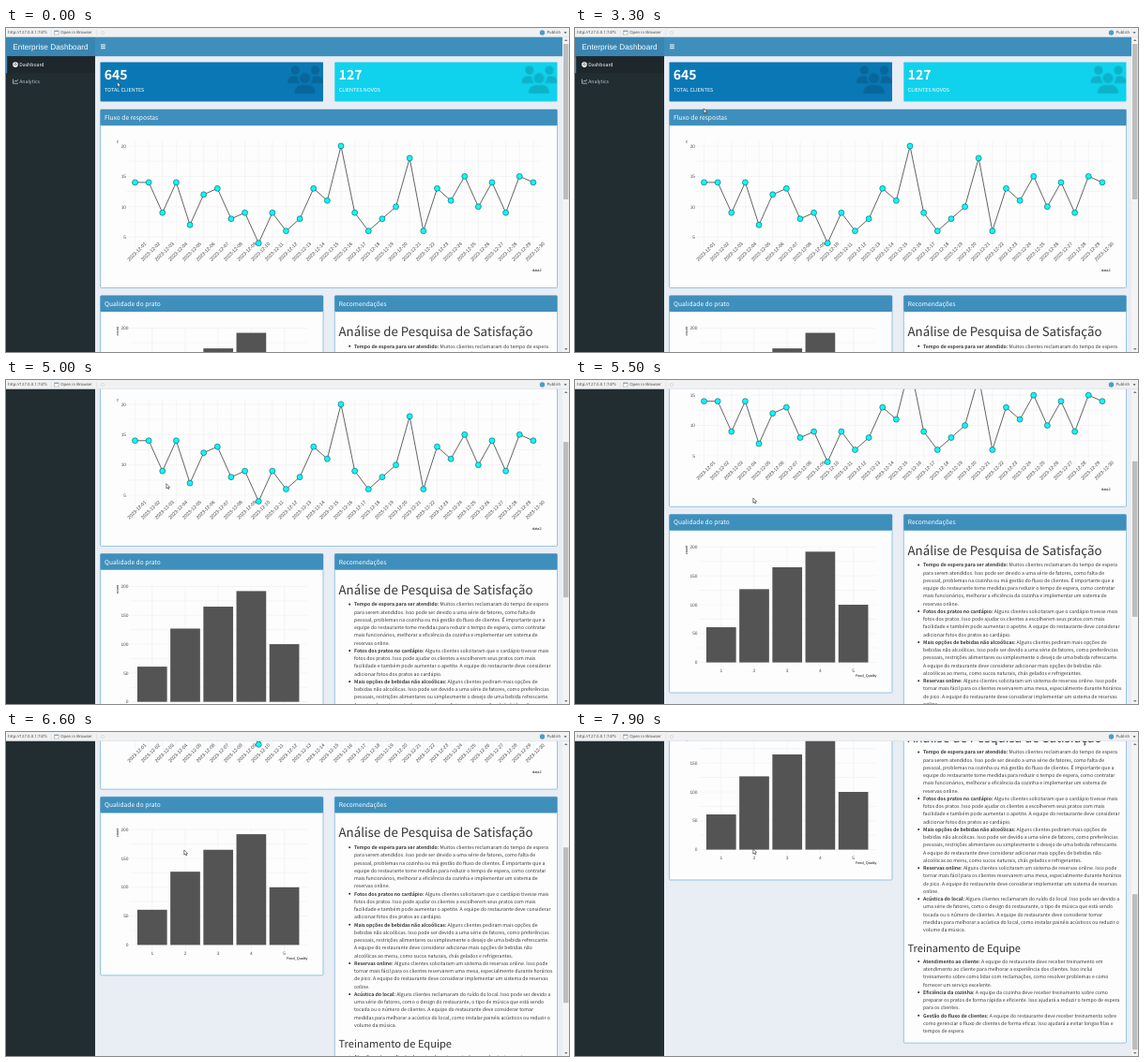
An HTML page that plays this animation: 600 px wide and 346 px high, repeating every 8 s.

```html
<!DOCTYPE html>
<html lang="pt">
<head>
<meta charset="utf-8">
<title>Enterprise Dashboard</title>
<style>
html, body { margin: 0; width: 100%; height: 100%; overflow: hidden; background: #e9edf4; }
svg { display: block; width: 600px; height: 346px; }
text { font-family: "Noto Sans CJK JP", "Noto Sans CJK SC", "Noto Sans CJK", sans-serif; text-rendering: geometricPrecision; white-space: pre; }
.plot text, .brand { font-family: "Liberation Sans", Arial, sans-serif; }
.tool text { font: 4.3px "Open Sans", sans-serif; fill: #3c3c3c; }
.body { font-size: 5.18px; fill: #383838; }
.grid { stroke: #ececee; stroke-width: .5; fill: none; }
.tick { font-size: 4.83px; fill: #4d4d4d; }
.date { font-size: 5.1px; fill: #444; }
.axis { font-size: 3.8px; fill: #111; }
.medium { font-weight: 500; }
.bold { font-weight: 700; }
</style>
</head>
<body>
<svg viewBox="0 0 600 346">
  <defs>
    <g id="side"><circle cx="144" cy="80" r="80"/><path d="M0 299C0 240 48 192 107 192h42q24 0 45 10q-12 70 41 118H21Q0 320 0 299z"/></g>
    <g id="users">
      <use href="#side"/><use href="#side" transform="matrix(-1 0 0 1 656 0)"/>
      <circle cx="320" cy="224" r="96"/>
      <path d="M128 485C128 412 188 352 261 352H379C452 352 512 412 512 485q0 27-27 27H155q-27 0-27-27z"/>
    </g>
  </defs>
  <rect width="600" height="346" fill="#e9edf4"/>
  <rect y="9" width="95" height="337" fill="#222d32"/>
  <g id="page"></g>
  <g id="scrollbar">
    <rect x="593" y="9" width="7" height="337" fill="#f4f4f4"/>
    <path d="M595 14l1.8-2 1.8 2zM595 342l1.8 2 1.8-2z" fill="#777"/>
    <rect id="thumb" x="594" y="17" width="5.4" height="166" fill="#bdbdbd"/>
  </g>
  <g class="tool">
    <rect width="600" height="9.6" fill="#f0f1f2"/>
    <path d="M0 9.5H600" stroke="#d5d8da" stroke-width=".5"/>
    <text x="2" y="6.3">http://127.0.0.1:7475</text>
    <rect x="51.5" y="3" width="4.6" height="4" fill="#fff" stroke="#8a9aa5" stroke-width=".5"/>
    <path d="M51.5 3.4h4.6" stroke="#8a9aa5"/>
    <text x="58.2" y="6.3">Open in Browser</text>
    <path d="M48.3 2v6M96.7 2v6" stroke="#d0d0d0" stroke-width=".4"/>
    <circle cx="103" cy="5" r="1.7" fill="none" stroke="#cfd4d8" stroke-width=".6"/>
    <circle cx="571.5" cy="5" r="2.7" fill="#4a9cc9"/>
    <text x="576.5" y="6.3">Publish</text>
    <path d="M594.6 4.2h3l-1.5 1.8z" fill="#444"/>
  </g>
  <path id="cursor" d="M0 0V5.2L1.2 4.1 2.1 6 3 5.6 2.1 3.8H3.8z" fill="#fff" stroke="#222" stroke-width=".55"/>
</svg>
<script>
const PERIOD = 8000, STEP = 100;
const BLUE = '#3f8fbc';
const byId = id => document.getElementById(id);
const range = (n, fn) => Array.from({ length: n }, (_, i) => fn(i)).join('');

const rect = (x, y, w, h, fill, extra = '') =>
  `<rect x="${x}" y="${y}" width="${w}" height="${h}" fill="${fill}" ${extra}/>`;
const text = (x, y, str, attrs = '') => `<text x="${x}" y="${y}" ${attrs}>${str}</text>`;

function panel(x, y, w, h, title) {
  return rect(x, y, w, h, '#fdfdfe', `rx="1.2" stroke="#6db0d6" stroke-width=".7"`) +
    rect(x, y, w, 17.2, BLUE, 'rx="1"') +
    text(x + 4.5, y + 11, title, 'font-size="6.65" class="medium" fill="#fff"');
}

function valueBox(x, w, fill, value, label) {
  return rect(x, 36.5, w, 42, fill, 'rx=".8"') +
    text(x + 4.3, 54.6, value, 'font-size="14.05" class="bold" fill="#fff"') +
    text(x + 4.5, 68.2, label, 'font-size="5.45" class="medium" fill="#fff"') +
    `<use href="#users" opacity=".15" transform="translate(${x + w - 38} 40.5) scale(.0578)"/>`;
}

function lineChart() {
  const values = [14, 14, 9, 14, 7, 12, 13, 8, 9, 4, 9, 6, 8, 13, 11,
    20, 9, 6, 8, 10, 18, 6, 13, 11, 15, 10, 14, 9, 15, 14];
  const n = values.length;
  const px = i => +(137.5 + i * 14.635).toFixed(2);
  const py = v => +(126 + (20 - v) * 6.48).toFixed(2);
  const grid = range(n, i => `M${px(i)} 120.8V235`) + range(7, i => `M128.7 ${py(5 + i * 2.5)}H570.8`);
  const dates = range(n, i => {
    const x = px(i) + 1.9, day = String(i + 1).padStart(2, '0');
    return text(x, 240.5, '2023-12-' + day, `class="date" text-anchor="middle" transform="rotate(-45 ${x} 238.7)"`);
  });
  return `<g class="plot"><path class="grid" d="${grid}"/>` +
    [5, 10, 15, 20].map(v => text(128, py(v) + 1.7, v, 'class="tick" text-anchor="end"')).join('') +
    dates +
    `<polyline points="${values.map((v, i) => px(i) + ',' + py(v)).join(' ')}" fill="none" stroke="#222" stroke-width=".7"/>` +
    values.map((v, i) => `<circle cx="${px(i)}" cy="${py(v)}" r="3" fill="#08fbf8" stroke="#134" stroke-width=".5"/>`).join('') +
    text(119.6, 122.6, 'n', 'class="axis" transform="rotate(-90 119.6 122.6)"') +
    text(570.6, 260.2, 'data2', 'class="axis" text-anchor="end"') + '</g>';
}

function barChart() {
  const counts = [61, 127, 165, 192, 100];
  const px = i => 155.8 + i * 35.2;
  const py = v => 443.8 - v * .616;
  const grid = range(5, i => `M${px(i)} 319.6V449.7`) + range(9, i => `M132 ${py(i * 25)}H321`);
  return `<g class="plot"><path class="grid" d="${grid}"/>` +
    counts.map((c, i) => rect(px(i) - 15.85, py(c), 31.7, c * .616, '#555455') +
      text(px(i), 454.2, i + 1, 'class="tick" text-anchor="middle"')).join('') +
    range(5, i => text(130.5, py(i * 50) + 1.7, i * 50, 'class="tick" text-anchor="end"')) +
    text(119.8, 328.4, 'count', 'class="axis" transform="rotate(-90 119.8 328.4)"') +
    text(321.5, 459.1, 'Food_Quality', 'class="axis" text-anchor="end"') + '</g>';
}

// Each item: bold lead, then wrapped lines separated by "|".
function list(y, items) {
  let out = '';
  for (const [lead, body] of items) {
    out += `<circle cx="366.2" cy="${(y - 1.9).toFixed(2)}" r="1.05" fill="#333"/>`;
    body.split('|').forEach((line, i) => {
      const head = i ? '' : `<tspan class="bold">${lead}:</tspan> `;
      out += text(371, y.toFixed(2), head + line, 'class="body"');
      y += 8.25;
    });
  }
  return out;
}

const advice = [
  ['Tempo de espera para ser atendido', 'Muitos clientes reclamaram do tempo de espera|para serem atendidos. Isso pode ser devido a uma série de fatores, como falta de|pessoal, problemas na cozinha ou má gestão do fluxo de clientes. É importante que a|equipe do restaurante tome medidas para reduzir o tempo de espera, como contratar|mais funcionários, melhorar a eficiência da cozinha e implementar um sistema de|reservas online.'],
  ['Fotos dos pratos no cardápio', 'Alguns clientes solicitaram que o cardápio tivesse mais|fotos dos pratos. Isso pode ajudar os clientes a escolherem seus pratos com mais|facilidade e também pode aumentar o apetite. A equipe do restaurante deve considerar|adicionar fotos dos pratos ao cardápio.'],
  ['Mais opções de bebidas não alcoólicas', 'Alguns clientes pediram mais opções de|bebidas não alcoólicas. Isso pode ser devido a uma série de fatores, como preferências|pessoais, restrições alimentares ou simplesmente o desejo de uma bebida refrescante.|A equipe do restaurante deve considerar adicionar mais opções de bebidas não|alcoólicas ao menu, como sucos naturais, chás gelados e refrigerantes.'],
  ['Reservas online', 'Alguns clientes solicitaram um sistema de reservas online. Isso pode|tornar mais fácil para os clientes reservarem uma mesa, especialmente durante horários|de pico. A equipe do restaurante deve considerar implementar um sistema de reservas|online.'],
  ['Acústica do local', 'Alguns clientes reclamaram do ruído do local. Isso pode ser devido a|uma série de fatores, como o design do restaurante, o tipo de música que está sendo|tocada ou o número de clientes. A equipe do restaurante deve considerar tomar|medidas para melhorar a acústica do local, como instalar painéis acústicos ou reduzir o|volume da música.']
];
const training = [
  ['Atendimento ao cliente', 'A equipe do restaurante deve receber treinamento em|atendimento ao cliente para melhorar a experiência dos clientes. Isso inclui|treinamento sobre como lidar com reclamações, como resolver problemas e como|fornecer um serviço excelente.'],
  ['Eficiência da cozinha', 'A equipe da cozinha deve receber treinamento sobre como|preparar os pratos de forma rápida e eficiente. Isso ajudará a reduzir o tempo de espera|para os clientes.'],
  ['Gestão do fluxo de clientes', 'A equipe do restaurante deve receber treinamento sobre|como gerenciar o fluxo de clientes de forma eficaz. Isso ajudará a evitar longas filas e|tempos de espera.']
];

const chrome =
  rect(0, 9, 95, 21.2, '#3a86b2') + rect(95, 9, 498, 21.2, BLUE) +
  text(47.5, 22.8, 'Enterprise Dashboard', 'class="brand" font-size="8.26" text-anchor="middle" fill="#fff"') +
  '<path d="M101 17.9h4.9M101 19.8h4.9M101 21.7h4.9" stroke="#fff" stroke-width=".9"/>' +
  rect(0, 30.2, 95, 18, '#1e282c') + rect(0, 30.2, 1.2, 18, BLUE) +
  '<circle cx="10" cy="39.1" r="2.8" fill="#fff"/><path d="M10 40.2V37.2M8.3 39h.1M11.6 39h.1" stroke="#1e282c" stroke-width=".7" stroke-linecap="round"/>' +
  text(14.2, 41.1, 'Dashboard', 'font-size="5.18" class="medium" fill="#fff"') +
  '<path d="M7.5 54.6v4.6H13M8.7 57.5l1.4-1.5 1.1 1 1.7-2" fill="none" stroke="#b8c7ce" stroke-width=".8"/>' +
  text(14.2, 59.2, 'Analytics', 'font-size="5.18" fill="#b8c7ce"');

byId('page').innerHTML = chrome +
  valueBox(100.5, 237.5, '#0a78b5', '645', 'TOTAL CLIENTES') +
  valueBox(350.3, 237.2, '#10d2ed', '127', 'CLIENTES NOVOS') +
  panel(100.5, 87, 487, 190.5, 'Fluxo de respostas') + lineChart() +
  panel(100.5, 285.7, 237.5, 190.5, 'Qualidade do prato') + barChart() +
  panel(350.3, 285.7, 237.2, 364.6, 'Recomendações') +
  text(354.5, 328.8, 'Análise de Pesquisa de Satisfação', 'font-size="13.3" fill="#333"') +
  list(341.6, advice) +
  text(354.5, 553.2, 'Treinamento de Equipe', 'font-size="11.1" fill="#333"') +
  list(565.1, training);

// Keys are [time, value]; linear or smoothed between neighbours.
function track(keys, t, ease = u => u) {
  const next = keys.findIndex(k => k[0] > t);
  if (next < 0) return keys[keys.length - 1][1];
  if (next === 0) return keys[0][1];
  const [t0, a] = keys[next - 1], [t1, b] = keys[next];
  return a + (b - a) * ease((t - t0) / (t1 - t0));
}
const smooth = u => u * u * (3 - 2 * u);
const scrollKeys = [[3800, 0], [4300, 41.2], [5500, 142.2], [6600, 216.4], [7900, 318.2]];
const cursorX = [[0, 118.6], [1400, 175.6], [3300, 137.2], [4300, 139.3], [5500, 189.8]];
const cursorY = [[0, 57.6], [1400, 80], [3300, 86], [4300, 85.2], [5500, 126], [6600, 126], [7900, 125]];

function draw(now) {
  const t = Math.floor((now % PERIOD) / STEP) * STEP;
  const scroll = track(scrollKeys, t);
  byId('page').setAttribute('transform', `translate(0 ${-scroll})`);
  byId('thumb').setAttribute('y', 17 + scroll * .491);
  byId('cursor').setAttribute('transform', `translate(${track(cursorX, t, smooth)} ${track(cursorY, t, smooth)})`);
}

const start = performance.now();
(function loop() {
  draw(performance.now() - start);
  requestAnimationFrame(loop);
})();
</script>
</body>
</html>
```
